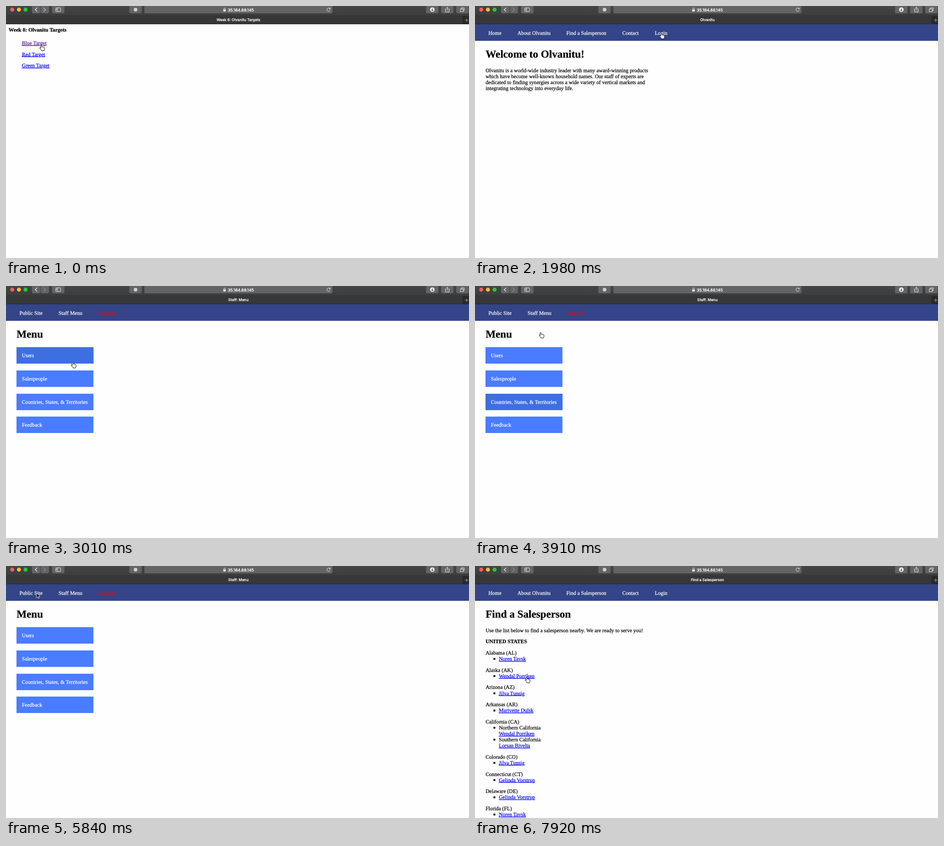
Animation of 1014x552 px, one loop 8 s. Source, as an HTML page:

```html
<!DOCTYPE html>
<html lang="en">
<head>
<meta charset="utf-8">
<title>Browser walkthrough</title>
<style>
html, body { margin: 0; width: 100%; height: 100%; overflow: hidden; background: #fefefe; }
svg { display: block; width: 1014px; height: 552px; }
text {
  font: 11.6px "Liberation Serif", serif; text-rendering: geometricPrecision; white-space: pre;
  fill: #000; stroke: #000; stroke-width: .25px;
}
.h1 { font-size: 23.2px; font-weight: bold; }
.bold { font-weight: bold; }
.white { fill: #fff; stroke: #fff; }
.red { fill: #f00; stroke: #f00; }
.link { fill: #00e; stroke: #00e; text-decoration: underline; }
.visited { fill: #551a8b; stroke: #551a8b; text-decoration: underline; }
.tab, .address { font: 500 8px Inter, sans-serif; fill: #fff; stroke: #fff; text-anchor: middle; }
.address { font-size: 8.8px; }
.button { fill: #636465; }
.icon { fill: none; stroke: #ededed; stroke-width: 1; }

.scene, .hover, .hand, .arrow { animation: 8s step-end -5ms infinite; }
#targets { animation-name: targets; }
#home { animation-name: home; }
#menu { animation-name: menu; }
#sales { animation-name: sales; }
.hover { fill: #3e6fe1; }
.hover0 { animation-name: hover0; }
.hover1 { animation-name: hover1; }
.hover2 { animation-name: hover2; }
.hand { animation-name: hand; }
.arrow { animation-name: arrow; }
#cursor { animation: move 8s step-end -5ms infinite; }

@keyframes targets { 0% { opacity: 1 } 5.75%, 100% { opacity: 0 } }
@keyframes home {
  0%, 30.375%, 93.25%, 100% { opacity: 0 }
  5.75%, 80.375% { opacity: 1 }
}
@keyframes menu { 0%, 80.375%, 100% { opacity: 0 } 30.375% { opacity: 1 } }
@keyframes sales { 0% { opacity: 0 } 93.25%, 100% { opacity: 1 } }
@keyframes hover0 {
  0%, 43.25%, 56.25%, 66%, 100% { opacity: 0 }
  37.625%, 54.4%, 64% { opacity: 1 }
}
@keyframes hover1 {
  0%, 45.1%, 58.125%, 64%, 100% { opacity: 0 }
  43.25%, 56.25%, 62% { opacity: 1 }
}
@keyframes hover2 {
  0%, 50.75%, 62%, 100% { opacity: 0 }
  45.1%, 58.125% { opacity: 1 }
}
@keyframes hand {
  0%, 24.75%, 99%, 100% { opacity: 1 }
  7.5%, 73% { opacity: 0 }
}
@keyframes arrow {
  0%, 24.75%, 99%, 100% { opacity: 0 }
  7.5%, 73% { opacity: 1 }
}
@keyframes move {
  0% { transform: translate(77px, 86px) }
  7.5% { transform: translate(77px, 86px); animation-timing-function: steps(3) }
  13.625% { transform: translate(138px, 143px); animation-timing-function: steps(3) }
  19.25% { transform: translate(428px, 58px) }
  24.75% { transform: translate(407.5px, 60px) }
  30.375% { transform: translate(407.5px, 60px); animation-timing-function: steps(4) }
  37.625% { transform: translate(146px, 167.5px) }
  39.5% { transform: translate(131.5px, 145px) }
  41.375% { transform: translate(131.5px, 145px); animation-timing-function: steps(3) }
  47% { transform: translate(140px, 286px) }
  48.875% { transform: translate(143.5px, 102px) }
  50.75% { transform: translate(138px, 56px); animation-timing-function: steps(3) }
  56.25% { transform: translate(138px, 200px); animation-timing-function: steps(2) }
  60% { transform: translate(138px, 286px); animation-timing-function: steps(4) }
  67.5% { transform: translate(122px, 52px) }
  69.25% { transform: translate(117px, 60px) }
  73% { transform: translate(67px, 59px) }
  80.375% { transform: translate(67px, 59px); animation-timing-function: steps(3) }
  85.75% { transform: translate(253px, 59px) }
  93.25% { transform: translate(253px, 59px); animation-timing-function: steps(3) }
  99%, 100% { transform: translate(113px, 244px) }
}
</style>
</head>
<body>
<svg viewBox="0 0 1014 552">
  <defs>
    <linearGradient id="toolbar" x2="0" y2="1">
      <stop stop-color="#444546"/><stop offset="1" stop-color="#3b3c3d"/>
    </linearGradient>
  </defs>
  <rect width="1014" height="552" fill="#fefefe"/>

  <rect width="1014" height="22" fill="url(#toolbar)"/>
  <rect y="21" width="1014" height="1" fill="#303132"/>
  <rect y="22" width="1014" height="18" fill="#363738"/>
  <rect x="1000" y="22" width="14" height="18" fill="#29292a"/>
  <path d="M1000.5 22V40M0 39.5H1014" stroke="#282829"/>
  <path d="M1005 31H1013M1009 27V35" stroke="#a8a8a8"/>
  <circle cx="13.7" cy="8" r="4.4" fill="#fe5f57"/>
  <circle cx="28.3" cy="8" r="4.4" fill="#febc2e"/>
  <circle cx="42.8" cy="8" r="4.4" fill="#28c840"/>
  <g id="buttons"></g>
  <g class="icon">
    <path d="M68 4L64 8L68 12" stroke-width="1.4"/>
    <path d="M82.5 4L86.5 8L82.5 12" stroke-width="1.4" stroke="#8b8c8d"/>
    <rect x="109" y="4" width="10.5" height="8" rx=".8"/>
    <path d="M112.8 4V12M110.2 6H111.8M110.2 8H111.8"/>
    <path d="M709.8 5.9A3.8 3.8 0 1 0 710.3 8.8M710.2 3.4V6.4H707.2"/>
    <path d="M964.3 6.5H962.5V13H970.5V6.5H968.7M966.5 10V2.8M964.3 4.8L966.5 2.6L968.7 4.8"/>
    <path d="M997 6.5V4H1003.5V10H1001.5M995 6.5H1001.5V12.3H995Z"/>
  </g>
  <circle cx="283.7" cy="8" r="4" fill="#d0d0d0"/>
  <circle cx="933.7" cy="8" r="5" fill="#f0f0f0"/>
  <path d="M933.7 5V10.5M931.4 8.3L933.7 10.7L936 8.3" fill="none" stroke="#58595a" stroke-width="1.2"/>
  <rect x="475.8" y="7.4" width="5.6" height="4.5" rx=".6" fill="#e8e8e8"/>
  <path d="M477 7.5V6A1.6 1.6 0 0 1 480.2 6V7.5" class="icon"/>
  <text class="address" x="514.3" y="11.6">35.184.88.145</text>

  <g class="scene" id="targets">
    <path d="M82.5 4L86.5 8L82.5 12" class="icon" stroke-width="1.4"/>
  </g>
  <g class="scene" id="home"></g>
  <g class="scene" id="menu"></g>
  <g class="scene" id="sales"></g>

  <g id="cursor">
    <path class="hand" fill="#fff" stroke="#000" stroke-linejoin="round" d="M-1.3 1.1a1.2 1.2 0 0 1 2.3-.4L2 3.8q1.1-.7 2 .2q1.2-.5 1.8.4q1.5-.2 1.6 1.2l.1 2.6q-.1 1.6-1 2.7v1.1H.9q-.4-1.6-2-3l-2.2-2.6q-.5-1.1.5-1.4q1 0 2.3 1.3z"/>
    <path class="arrow" fill="#000" stroke="#fff" stroke-width=".9" d="M0 0V10.6L2.4 8.4L4 12L5.8 11.2L4.2 7.8H7.4Z"/>
  </g>
</svg>
<script>
const LINE = 13.06, MARGIN = 11.6;

function add(parent, tag, attrs, content = '') {
  const node = document.createElementNS('http://www.w3.org/2000/svg', tag);
  for (const key in attrs) node.setAttribute(key, attrs[key]);
  node.textContent = content;
  return parent.appendChild(node);
}
const rect = (parent, x, y, width, height, attrs) =>
  add(parent, 'rect', { x, y, width, height, ...attrs });
const text = (parent, x, y, content, style = '') =>
  add(parent, 'text', { x, y, class: style }, content);
const scene = id => document.getElementById(id);

function page(id, tab, heading, nav) {
  const root = scene(id);
  text(root, 509, 33.4, tab, 'tab');
  rect(root, 0, 40, 1014, 36.3, { fill: '#334488' });
  for (const [x, label, style = 'white'] of nav) text(root, x, 62.5, label, style);
  text(root, 23.2, 113, heading, 'h1');
  return root;
}

const buttons = scene('buttons');
const spans = [[57, 18], [76, 18], [101, 27], [270, 27], [303, 412], [920, 27], [953, 27], [986, 27]];
for (const [x, width] of spans) rect(buttons, x, -4, width, 20, { rx: 3, class: 'button' });

const targets = scene('targets');
text(targets, 509, 33.4, 'Week 8: Olvanitu Targets', 'tab');
text(targets, 5.8, 56, 'Week 8: Olvanitu Targets', 'bold');
['Blue', 'Red', 'Green'].forEach((color, i) =>
  text(targets, 34.8, 85 + i * 24.6, color + ' Target', i ? 'link' : 'visited'));

const publicNav = [[29.5, 'Home'], [93, 'About Olvanitu'], [200, 'Find a Salesperson'],
  [322.5, 'Contact'], [393.7, 'Login']];

const home = page('home', 'Olvanitu', 'Welcome to Olvanitu!', publicNav);
[
  'Olvanitu is a world-wide industry leader with many award-winning products',
  'which have become well-known household names. Our staff of experts are',
  'dedicated to finding synergies across a wide variety of vertical markets and',
  'integrating technology into everyday life.'
].forEach((line, i) => text(home, 23.2, 144.6 + i * LINE, line));

const menu = page('menu', 'Staff: Menu', 'Menu',
  [[29.5, 'Public Site'], [115, 'Staff Menu'], [202, 'Log out', 'red']]);
['Users', 'Salespeople', 'Countries, States, & Territories', 'Feedback'].forEach((label, i) => {
  const y = 134 + Math.round(i * 50.8);
  rect(menu, 23, y, 168.5, 36, { fill: '#497cff' });
  if (i < 3) rect(menu, 23, y, 168.5, 36, { class: 'hover hover' + i });
  text(menu, 34.8, y + 22.2, label, 'white');
});

const sales = page('sales', 'Find a Salesperson', 'Find a Salesperson', publicNav);
text(sales, 23.2, 144.6, 'Use the list below to find a salesperson nearby. We are ready to serve you!');
text(sales, 23.2, 169.3, 'UNITED STATES', 'bold');

const [noren, wendal, jilva, marivette, lorsan, gelinda] = ['Noren Tavsk', 'Wendal Porriken',
  'Jilva Tunsig', 'Marivette Dulsk', 'Lorsan Bivelta', 'Gelinda Vorstrup'];
const states = [
  ['Alabama (AL)', [noren]],
  ['Alaska (AK)', [wendal]],
  ['Arizona (AZ)', [jilva]],
  ['Arkansas (AR)', [marivette]],
  ['California (CA)', [wendal, 'Northern California'], [lorsan, 'Southern California']],
  ['Colorado (CO)', [jilva]],
  ['Connecticut (CT)', [gelinda]],
  ['Delaware (DE)', [gelinda]],
  ['Florida (FL)', [noren]]
];
let y = 194;
for (const [state, ...entries] of states) {
  text(sales, 23.2, y, state);
  for (const [name, region] of entries) {
    y += LINE;
    rect(sales, 40.5, y - 5.6, 4, 4);
    if (region) {
      text(sales, 52.2, y, region);
      y += LINE;
    }
    text(sales, 52.2, y, name, 'link');
  }
  y += LINE + MARGIN;
}
</script>
</body>
</html>
```
